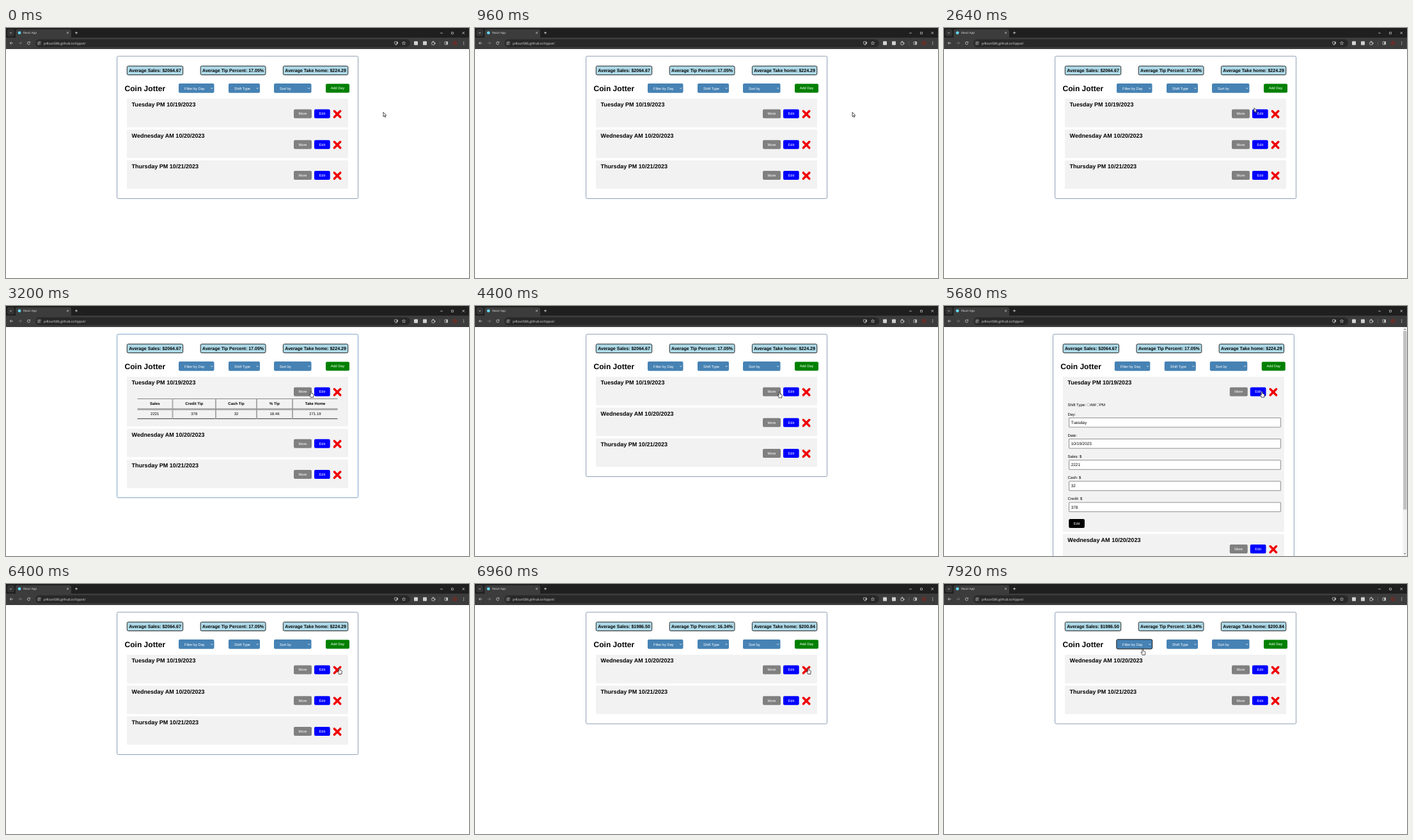
Animation of 724 by 392 pixels, one loop 8 s. Source, as an HTML page with a canvas:

```html
<!DOCTYPE html>
<html lang="en">
<head>
<meta charset="utf-8">
<title>React App</title>
<style>
  html, body { margin: 0; width: 100%; height: 100%; overflow: hidden; background: #fff; }
  canvas { display: block; width: 724px; height: 392px; }
</style>
</head>
<body>
<canvas id="stage"></canvas>
<script>
const W = 724, H = 392, LOOP = 8000;
const ARIAL = '"Liberation Sans", Arial, sans-serif';
const UI = '"Open Sans", "Noto Sans", sans-serif';
const STEEL = '#4682b4';

const canvas = document.getElementById('stage');
const ctx = canvas.getContext('2d');
const dpr = window.devicePixelRatio || 1;
canvas.width = W * dpr;
canvas.height = H * dpr;

// Moments at which the page changes
const MORE_ON = 3200, MORE_OFF = 4400;
const EDIT_ON = 4800, EDIT_OFF = 5760;
const REMOVED = 6560, FOCUSED = 7840;

// Pointer path: time, x, y
const path = [
  [0, 590, 132], [2240, 590, 132], [2480, 542, 137], [2640, 485, 125.3],
  [2800, 473, 145], [2960, 471, 141], [3120, 477, 134], [3440, 477, 134],
  [3680, 473.8, 134.8], [4320, 473.8, 134.8], [4720, 495, 134.5],
  [4880, 496.8, 134], [5600, 496.8, 134], [5920, 499, 134],
  [6400, 521.2, 132], [7200, 521.2, 132], [7840, 310.8, 102], [8000, 310.8, 102]
];

const days = ['Tuesday PM 10/19/2023', 'Wednesday AM 10/20/2023', 'Thursday PM 10/21/2023'];
const selects = [
  ['Filter by Day', 270, 55.5, 279], ['Shift Type', 348, 49, 357], ['Sort by', 419, 58.5, 428]
];
const columns = [
  ['Sales', '2221', 205.5, 260], ['Credit Tip', '378', 261, 327.5], ['Cash Tip', '32', 328.5, 391.5],
  ['% Tip', '18.46', 392.5, 447.5], ['Take Home', '271.19', 448.5, 518.5]
];
const fields = [
  ['Day:', 'Tuesday'], ['Date:', '10/19/2023'], ['Sales: $', '2221'], ['Cash: $', '32'], ['Credit: $', '378']
];

const arrowShape = new Path2D('M0 0V7L1.6 5.6L2.6 7.9L3.7 7.4L2.7 5.2H4.8Z');
const handShape = new Path2D('M-.9 .5Q0 -.6 .9 .5V3.2L3.5 3.9Q4.2 4.2 4.1 5.4L3.6 7.8V9.2H-.9V8.2L-2.9 5.2Q-2.5 4.2 -1.6 5L-.9 5.6Z');

function rect(x, y, w, h, fill, r = 0) {
  ctx.beginPath();
  ctx.roundRect(x, y, w, h, r);
  ctx.fillStyle = fill;
  ctx.fill();
}

function frame(x, y, w, h, color, r = 0, lw = 1) {
  ctx.beginPath();
  ctx.roundRect(x, y, w, h, r);
  ctx.strokeStyle = color;
  ctx.lineWidth = lw;
  ctx.stroke();
}

function line(points, color, lw = 0.8) {
  ctx.beginPath();
  for (let i = 0; i < points.length; i += 2) ctx.lineTo(points[i], points[i + 1]);
  ctx.strokeStyle = color;
  ctx.lineWidth = lw;
  ctx.stroke();
}

function dot(x, y, r, fill) {
  ctx.beginPath();
  ctx.arc(x, y, r, 0, 7);
  ctx.fillStyle = fill;
  ctx.fill();
}

function ring(x, y, r, color, lw = 0.7, from = 0, to = 7) {
  ctx.beginPath();
  ctx.arc(x, y, r, from, to);
  ctx.strokeStyle = color;
  ctx.lineWidth = lw;
  ctx.stroke();
}

// y is the middle of the capitals
function text(s, x, y, size, { color = '#000', bold = false, align = 'left', font = ARIAL } = {}) {
  ctx.font = `${bold ? 'bold ' : ''}${size}px ${font}`;
  ctx.fillStyle = color;
  ctx.textAlign = align;
  ctx.fillText(s, x, y + size * 0.36);
}

function button(label, x, y, w, fill) {
  rect(x, y, w, 14, fill, 2);
  text(label, x + w / 2, y + 7, 5.65, { color: '#fff', align: 'center' });
}

function drawTabs() {
  rect(0, 0, W, 15, '#1f1f1f');
  rect(2, 2, 11, 11, '#343434', 3);
  line([6, 7, 7.5, 8.5, 9, 7], '#e0e0e0');
  rect(15, 2, 87, 14, '#3c3c3c', 3);
  dot(21, 7.6, 2.4, '#61dafb');
  text('React App', 27, 7.7, 4.5, { color: '#e3e3e3', font: UI });
  line([95, 6, 98, 9], '#ddd', 0.7);
  line([98, 6, 95, 9], '#ddd', 0.7);
  line([108, 7.5, 112, 7.5], '#ddd');
  line([110, 5.5, 110, 9.5], '#ddd');
  line([679, 8, 683, 8], '#ddd', 0.7);
  frame(696.5, 6.5, 3, 3, '#ddd', 0.4, 0.7);
  line([713.5, 6, 717, 9.5], '#eee', 0.7);
  line([717, 6, 713.5, 9.5], '#eee', 0.7);
}

function drawToolbar() {
  const ink = '#d0d0d0';
  rect(0, 15, W, 18, '#3c3c3c');
  line([11, 23.7, 6.3, 23.7], ink);
  line([8.4, 21.5, 6.2, 23.7, 8.4, 25.9], ink);
  line([19.5, 23.7, 24.2, 23.7], '#7c7c7c');
  line([22.1, 21.5, 24.3, 23.7, 22.1, 25.9], '#7c7c7c');
  ring(35.5, 23.7, 2.1, ink, 0.8, 0.3, 5.5);
  line([37.7, 21.2, 37.7, 23, 35.9, 23], ink, 0.7);

  rect(46, 17.8, 586, 12.2, '#282828', 6);
  dot(51.7, 23.7, 4, '#3c3c3c');
  line([49.8, 22.4, 52, 22.4], ink, 0.7);
  line([51.5, 25, 53.7, 25], ink, 0.7);
  ring(53, 22.4, 0.7, ink, 0.6);
  ring(50.5, 25, 0.7, ink, 0.6);
  text('p4lzun586.github.io/tippot/', 59, 23.8, 5.15, { color: '#e3e3e3', font: UI });

  frame(607.5, 21.3, 4.8, 3.8, ink, 0.5, 0.7);
  line([608.8, 26.4, 611.2, 26.4], ink, 0.7);
  rect(610.5, 22.5, 2.5, 2, ink);
  ctx.beginPath();
  for (let i = 0; i < 10; i++) {
    const a = i * Math.PI / 5 - Math.PI / 2, r = i % 2 ? 1.2 : 2.8;
    ctx.lineTo(622 + r * Math.cos(a), 23.8 + r * Math.sin(a));
  }
  ctx.closePath();
  ctx.strokeStyle = ink;
  ctx.lineWidth = 0.6;
  ctx.stroke();

  rect(638, 20.8, 6, 6, '#d4d4d4', 0.8);
  rect(652, 20.8, 6, 6, '#cfcfcf', 0.8);
  frame(665.8, 22, 4.3, 4.2, ink, 0.5, 0.8);
  dot(668, 21.5, 1, ink);
  dot(670.6, 24, 1, ink);
  line([678.5, 20.5, 678.5, 27], '#5e5e5e', 0.7);
  frame(686, 21.5, 4.6, 4.4, ink, 0.4, 0.7);
  rect(688.4, 21.5, 2.2, 4.4, ink);
  dot(702, 23.7, 3.6, '#62302a');
  for (const y of [21.7, 23.7, 25.7]) dot(715.7, y, 0.6, ink);
}

function drawHeader(removed, focused) {
  const stats = removed ? ['$1986.50', '16.34%', '$200.84'] : ['$2064.67', '17.05%', '$224.29'];
  const boxes = [['Average Sales: ', 189.3, 87.4], ['Average Tip Percent: ', 304.2, 101.8], ['Average Take home: ', 433.4, 101.4]];
  boxes.forEach(([label, x, w], i) => {
    rect(x, 59.7, w, 13.8, '#add8e6', 2);
    frame(x, 59.7, w, 13.8, '#111', 2, 0.9);
    text(label + stats[i], x + w / 2, 66.7, 7.05, { bold: true, align: 'center' });
  });

  text('Coin Jotter', 185.5, 94.5, 12.06, { bold: true });
  selects.forEach(([label, x, w, tx], i) => {
    rect(x, 87, w, 14.8, STEEL, 2);
    if (focused && i === 0) frame(x - 0.2, 86.9, w + 0.4, 15, '#111', 2, 1);
    text(label, tx, 94.6, 5.65, { color: '#fff' });
    const cx = x + w - 3.8;
    line([cx - 1.5, 93.8, cx, 95.3, cx + 1.5, 93.8], '#fff', 0.8);
  });
  button('Add Day', 500, 87.4, 37, '#008000');
}

function drawDay(title, y, h) {
  rect(189, y, 346, h, '#f2f2f2');
  text(title, 196.5, y + 9.2, 9.05, { bold: true });
  button('More', 450, y + 16.4, 28, '#808080');
  button('Edit', 482, y + 16.4, 24.7, '#0000ff');
  const cy = y + 24;
  ctx.lineCap = 'round';
  line([513.4, cy - 4.7, 522.8, cy + 4.7], '#f00000', 3.5);
  line([522.8, cy - 4.7, 513.4, cy + 4.7], '#f00000', 3.5);
  ctx.lineCap = 'butt';
}

function drawTable() {
  for (const [head, value, x0, x1] of columns) {
    const mid = (x0 + x1) / 2;
    line([x0, 145.5, x1, 145.5], '#777', 0.9);
    line([x0, 161.2, x1, 161.2], '#555', 0.8);
    line([x0, 162.8, x1, 162.8], '#777', 0.8);
    line([x0, 176.8, x1, 176.8], '#333', 1.1);
    if (x1 < 500) {
      line([x1, 145, x1, 177.2], '#777', 0.6);
      line([x1 + 1, 145, x1 + 1, 177.2], '#777', 0.6);
    }
    text(head, mid, 153.1, 6.03, { bold: true, align: 'center' });
    text(value, mid, 168.9, 6.03, { align: 'center' });
  }
}

function drawForm() {
  const size = 6.03;
  text('Shift Type:', 196.7, 155.3, size);
  [[228.9, 'AM'], [243.7, 'PM']].forEach(([x, label]) => {
    dot(x, 154.7, 2.2, '#fff');
    ring(x, 154.7, 2.1, '#767676', 0.5);
    text(label, x + 2.5, 155.3, size);
  });
  fields.forEach(([label, value], i) => {
    const y = 169.6 + i * 33.15;
    text(label, 196.7, y, size);
    rect(198.7, y + 5.8, 331, 14.6, '#fff');
    frame(198.7, y + 5.8, 331, 14.6, '#767676', 0.5, 0.8);
    text(value, 201.9, y + 13, 6.45);
  });
  button('Edit', 198.4, 334, 24.7, '#000');
}

function drawScrollbar() {
  rect(717.6, 33, 6.4, 359, '#f1f1f1');
  rect(718.2, 39.3, 5.2, 280, '#c1c1c1');
  for (const [y, d] of [[36.4, -1], [388.6, 1]]) {
    ctx.beginPath();
    ctx.moveTo(719.3, y - d * 0.8);
    ctx.lineTo(722.3, y - d * 0.8);
    ctx.lineTo(720.8, y + d * 0.9);
    ctx.fillStyle = '#505050';
    ctx.fill();
  }
}

function drawPage(t) {
  const more = t >= MORE_ON && t < MORE_OFF;
  const edit = t >= EDIT_ON && t < EDIT_OFF;
  const removed = t >= REMOVED;
  const list = removed ? days.slice(1) : days;
  const extra = more ? 33.1 : edit ? 198.2 : 0;

  ctx.save();
  if (edit) ctx.translate(-3.2, 0);
  frame(173.6, 44.2, 377, 78.4 + list.length * 48.3 + extra, more ? '#6f9cc2' : '#8095ae', 2, 0.9);
  drawHeader(removed, t >= FOCUSED);
  let y = 111;
  list.forEach((title, i) => {
    const h = 44.7 + (i ? 0 : extra);
    drawDay(title, y, h);
    y += h + 3.6;
  });
  if (more) drawTable();
  if (edit) drawForm();
  ctx.restore();
  if (edit) drawScrollbar();
}

function pointerAt(t) {
  const i = path.findIndex(p => p[0] > t);
  const [t0, x0, y0] = path[i - 1], [t1, x1, y1] = path[i];
  const u = (t - t0) / (t1 - t0), k = u * u * (3 - 2 * u);
  return [x0 + (x1 - x0) * k, y0 + (y1 - y0) * k];
}

function isClickable(x, y) {
  const inside = ([a, b]) => x >= a && x <= b;
  if (y >= 127 && y <= 142) return [[450, 478], [482, 506.7], [511, 525]].some(inside);
  return y >= 87 && y <= 102.5 && selects.some(([, sx, w]) => inside([sx, sx + w]));
}

function drawPointer(t) {
  const [x, y] = pointerAt(t);
  const shape = isClickable(x, y) ? handShape : arrowShape;
  ctx.save();
  ctx.translate(x, y);
  ctx.fillStyle = '#fff';
  ctx.fill(shape);
  ctx.strokeStyle = '#000';
  ctx.lineWidth = 0.7;
  ctx.lineJoin = 'round';
  ctx.stroke(shape);
  ctx.restore();
}

function draw(now) {
  const t = now % LOOP;
  ctx.setTransform(dpr, 0, 0, dpr, 0, 0);
  ctx.textRendering = 'geometricPrecision';
  rect(0, 0, W, H, '#fff');
  drawPage(t);
  drawTabs();
  drawToolbar();
  drawPointer(t);
}

const start = performance.now();
function tick() {
  draw(performance.now() - start);
  requestAnimationFrame(tick);
}
tick();
</script>
</body>
</html>
```
